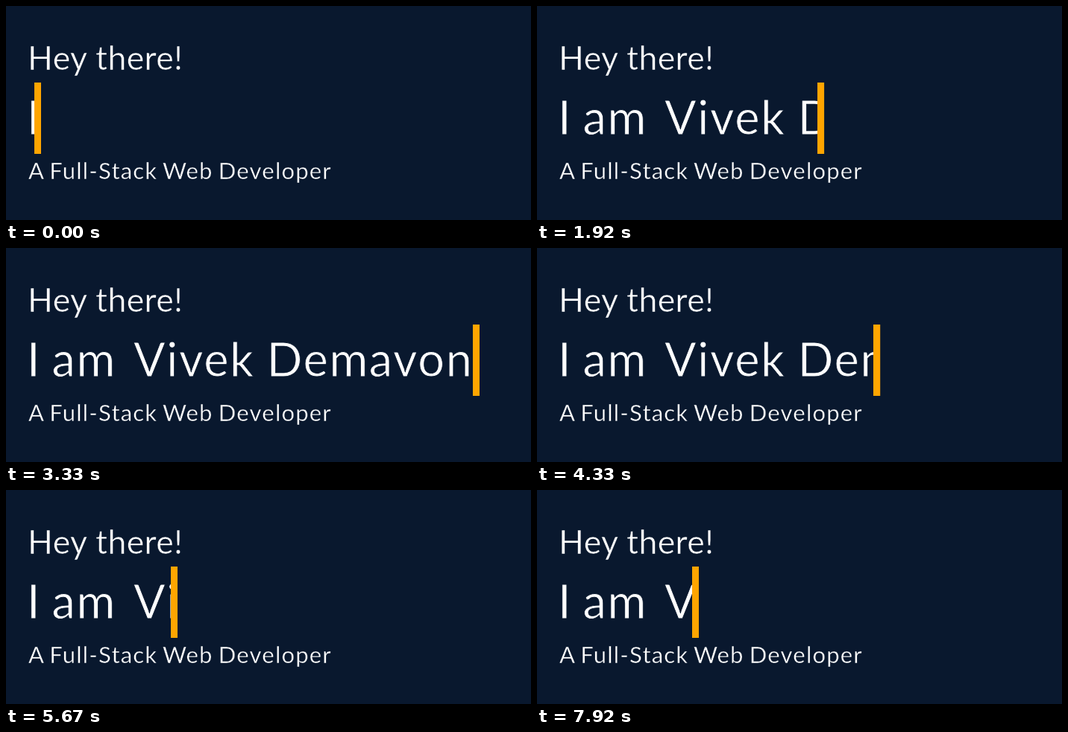
These frames come from a looping animation (704x288 px, 8000 ms). An HTML page:

```html
<!DOCTYPE html>
<html lang="en">
<head>
<meta charset="utf-8">
<title>Typing intro</title>
<style>
  html, body {
    margin: 0;
    width: 100%;
    height: 100%;
    overflow: hidden;
    background: #09182e;
  }
  svg { display: block; }
  /* the thin background stroke slims the letter stems */
  text {
    fill: #fff;
    stroke: #09182e;
    stroke-width: .012em;
    font-family: Lato, "Open Sans", sans-serif;
  }
  .greeting { font-size: 44.5px; letter-spacing: .4px; }
  .name { font-size: 63px; letter-spacing: 1.6px; }
  .role { font-size: 31px; letter-spacing: 1.2px; word-spacing: -2px; }
  .cover { fill: #09182e; }
  .cursor { fill: #ffa500; }

  /* 96 pictures in 8 s; each segment advances one step per picture */
  .wipe { animation: wipe 8s -4ms infinite; }
  @keyframes wipe {
    0%       { transform: translateX(38px);  animation-timing-function: steps(40); }
    41.6667% { transform: translateX(626px); animation-timing-function: steps(10); }
    52.0833% { transform: translateX(480px); animation-timing-function: steps(18); }
    70.8333% { transform: translateX(221px); animation-timing-function: steps(11); }
    82.2917% { transform: translateX(64px);  animation-timing-function: steps(2); }
    84.375%  { transform: translateX(35px);  animation-timing-function: steps(1); }
    85.4167% { transform: translateX(30px);  animation-timing-function: steps(1); }
    86.4583% { transform: translateX(31.4px); animation-timing-function: steps(13); }
    100%     { transform: translateX(222.7px); }
  }
</style>
</head>
<body>
<svg width="704" height="288" viewBox="0 0 704 288">
  <text class="greeting" x="29" y="86">Hey there!</text>
  <text class="name" x="28" y="173">I <tspan x="61.5">am </tspan><tspan x="171">Vivek </tspan><tspan x="349.5">Demavon</tspan></text>
  <text class="role" x="30" y="233">A Full-Stack Web Developer</text>
  <g class="wipe">
    <rect class="cover" y="103" width="704" height="96"/>
    <rect class="cursor" y="103" width="9" height="96"/>
  </g>
</svg>
</body>
</html>
```
